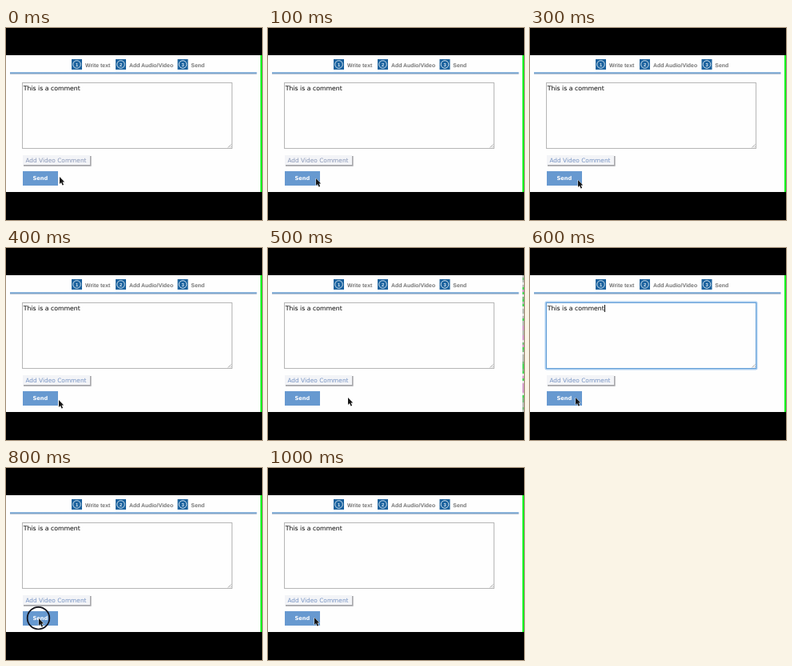
Animation, 320 px wide and 240 px high, one loop 1100 ms. Source, as an HTML page:

```html
<!DOCTYPE html>
<html lang="en">
<head>
<meta charset="utf-8">
<title>Sending a comment</title>
<style>
  html, body { margin: 0; width: 100%; height: 100%; overflow: hidden; background: #000; }
  svg { display: block; width: 320px; height: 240px; }
  text { font-family: "DejaVu Sans", sans-serif; text-rendering: geometricPrecision; }
  .step { font: bold 6.9px "Liberation Sans", Arial, sans-serif; fill: #737373; }
  .digit { font: bold 5.8px "Liberation Sans", Arial, sans-serif; fill: #e4eef6; text-anchor: middle; }
</style>
</head>
<body>
<svg viewBox="0 0 320 240">
  <defs>
    <linearGradient id="rule" x2="0" y2="1">
      <stop offset="0" stop-color="#b4cfe9"/>
      <stop offset=".35" stop-color="#649bd0"/>
      <stop offset=".6" stop-color="#a3b6ca"/>
      <stop offset="1" stop-color="#f6f6f8"/>
    </linearGradient>
    <g id="badge">
      <rect width="13" height="13" fill="#1b629e"/>
      <circle cx="6.5" cy="6.5" r="4.8" fill="none" stroke="#d3e4f0" stroke-width="1"/>
    </g>
  </defs>

  <rect y="34" width="320" height="171" fill="#fefefe"/>
  <g id="steps"></g>
  <rect x="5" y="55" width="308.5" height="3.5" fill="url(#rule)"/>

  <rect id="glow" x="20" y="68" width="263" height="83" rx="1" fill="none" stroke="#a9cdf0" stroke-width="3"/>
  <rect id="field" x="20.5" y="68.5" width="262" height="82" fill="#fefefe"/>
  <path d="M277.5 149.5l4-4M280 149.5l1.7-1.7" stroke="#999" stroke-width=".8"/>
  <text x="21.8" y="78" font-size="7.75">This is a comment</text>
  <path id="caret" d="M93.5 71v9" stroke="#111"/>

  <rect x="22" y="160" width="84.6" height="12.8" fill="#a6a6aa"/>
  <rect x="21" y="159" width="84" height="12" fill="#f3f4f7"/>
  <text id="video" x="24.4" y="168" font-size="7.42">Add Video Comment</text>

  <rect x="21" y="179" width="44" height="18" fill="#6799d0"/>
  <text x="33.5" y="190.4" font-size="6.7" font-weight="bold" fill="#fff">Send</text>

  <g id="edge"></g>
  <circle id="ring" cx="40.5" cy="187.7" r="13.8" fill="none" stroke="#101018" stroke-width="1.7"/>
  <path id="pointer" d="M0 0V9L2 7.1L3.5 10.6L5.1 9.9L3.6 6.5H6.2Z"
        fill="#151515" stroke="#fff" stroke-width=".8" paint-order="stroke"/>
</svg>
<script>
  const $ = id => document.getElementById(id);
  const STEP = 100;

  // Pointer tip for each step of the loop.
  const path = [
    [67, 186], [60, 188], [54, 190], [60, 190], [66, 190], [100, 187],
    [57, 187], [49, 187], [41, 188], [50, 187], [58, 187]
  ];
  const focused = [6, 7], pressed = [8], speckled = [2, 5];

  const labels = [[82, 99, "Write text"], [137, 154, "Add Audio/Video"], [214.5, 231.3, "Send"]];
  $("steps").innerHTML = labels.map(([x, tx, label], i) =>
    `<use href="#badge" x="${x}" y="39"/>
     <text class="digit" x="${x + 6.5}" y="47.6">${i + 1}</text>
     <text class="step" x="${tx}" y="49">${label}</text>`).join("");

  const stripe = (y, height, color) =>
    `<rect x="318" y="${y}" width="2" height="${height}" fill="${color}"/>`;

  function edge(step) {
    if (!speckled.includes(step)) return stripe(34, 171, "#0cf41c");
    const colors = ["#48d858", "#b5bdb5", "#d39ccb", "#7bbd80", "#e5e5e5"];
    let seed = step + 7, out = "";
    for (let y = 34; y < 205; y += 3) {
      seed = (seed * 1103 + 12345) % 65536;
      out += stripe(y, 3, colors[seed % colors.length]);
    }
    return out;
  }

  const show = (id, on) => $(id).setAttribute("visibility", on ? "visible" : "hidden");

  function draw(step) {
    const focus = focused.includes(step);
    show("glow", focus);
    show("caret", focus);
    show("ring", pressed.includes(step));
    $("field").setAttribute("stroke", focus ? "#659fd6" : "#b6b6b6");
    $("video").setAttribute("fill", step < 2 ? "#8795b5" : "#7693c3");
    $("pointer").setAttribute("transform", `translate(${path[step]})`);
    $("edge").innerHTML = edge(step);
  }

  const start = performance.now();
  let last = -1;
  function tick() {
    const step = Math.floor((performance.now() - start) / STEP) % path.length;
    if (step !== last) draw(last = step);
    requestAnimationFrame(tick);
  }
  tick();
</script>
</body>
</html>
```
